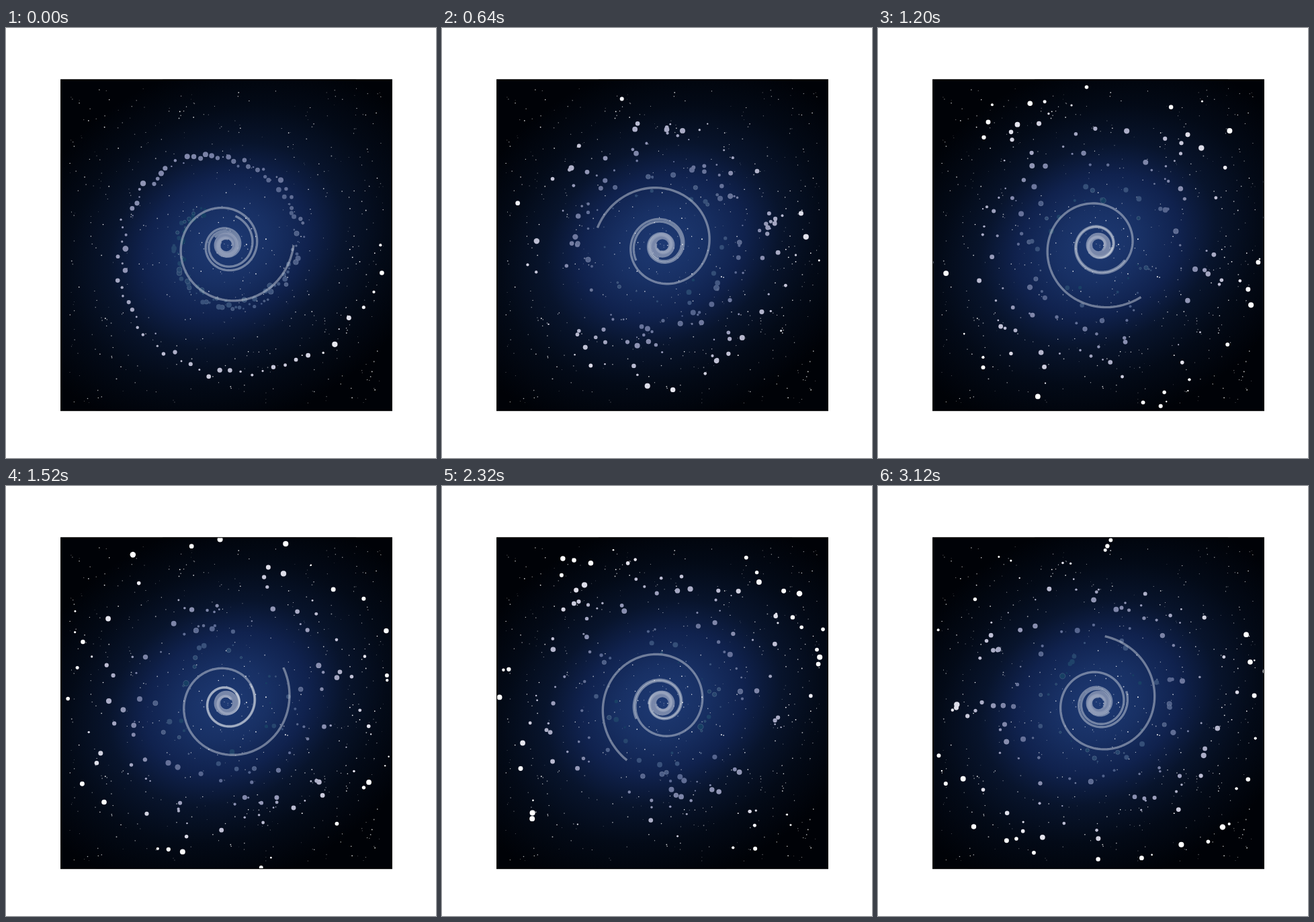
These frames come from a looping animation (640 by 640 pixels, 3200 ms). An HTML page with a canvas:

```html
<!DOCTYPE html>
<html lang="en">
<head>
<meta charset="utf-8">
<title>Spiral galaxy</title>
<style>
html, body { margin: 0; width: 100%; height: 100%; overflow: hidden; background: #fff; }
canvas { display: block; }
</style>
</head>
<body>
<canvas id="stage" width="640" height="640"></canvas>
<script>
const ctx = document.getElementById('stage').getContext('2d');
const TAU = Math.PI * 2, SIDE = 492.8, HALF = SIDE / 2;
const STEP = 80, STEPS = 40, SPREAD_STEPS = 14;
const DECAY = 0.126, INNER = 9.3;

let seed = 11;
function rand(a = 0, b = 1) {
  seed = (seed * 1664525 + 1013904223) % 4294967296;
  return a + (b - a) * seed / 4294967296;
}

// Stars start along one long spiral and then scatter
const stars = Array.from({ length: 165 }, (_, i) => {
  const angle = 10.5 * (i / 165) ** 0.8;
  return {
    angle,
    start: 234 * Math.exp(-DECAY * angle) + rand(-9, 9),
    goal: rand(65, 265),
    size: rand(1, 4.2),
    speed: rand(0.08, 0.5),
    rim: rand() < 0.4
  };
});

const specks = Array.from({ length: 560 }, () => ({
  x: rand(-233, 234), y: rand(-234, 235), size: rand(0.3, 0.95), alpha: rand(0.35, 1)
}));

function disc(x, y, r, fill) {
  ctx.fillStyle = fill;
  ctx.beginPath();
  ctx.arc(x, y, r, 0, TAU);
  ctx.fill();
}

// Teal near the centre, white at the rim
function tint(dist) {
  const k = Math.min(1, Math.max(0, (dist - 65) / 170));
  return `rgb(${20 + 235 * k}, ${62 + 193 * k ** 1.25}, ${98 + 157 * k})`;
}

function nebula() {
  ctx.fillStyle = '#000207';
  ctx.fillRect(-HALF, -HALF, SIDE, SIDE);
  const g = ctx.createRadialGradient(0, 0, 0, 0, 0, 330);
  g.addColorStop(0, '#1e3a74');
  g.addColorStop(0.2, '#183064');
  g.addColorStop(0.38, '#10224e');
  g.addColorStop(0.55, '#08142c');
  g.addColorStop(0.75, '#030a17');
  g.addColorStop(1, '#000207');
  ctx.save();
  ctx.rotate(-0.45);
  ctx.scale(1, 0.8);
  disc(0, 0, 330, g);
  ctx.restore();
}

function spiral(outer, turn) {
  const sweep = Math.log(outer / INNER) / DECAY;
  ctx.beginPath();
  for (let a = 0; a < sweep; a += 0.05) {
    const r = outer * Math.exp(-DECAY * a);
    ctx.lineTo(r * Math.cos(a - turn), r * Math.sin(a - turn));
  }
  ctx.stroke();
}

function drawStar(s, n) {
  const r = s.start + (s.goal - s.start) * Math.min(1, n / SPREAD_STEPS);
  const a = s.angle - s.speed * n;
  disc(r * Math.cos(a), r * Math.sin(a), s.size, tint(r));
  if (s.rim) {
    ctx.strokeStyle = 'rgba(255,255,255,.2)';
    ctx.lineWidth = 0.7;
    ctx.stroke();
  }
}

function draw(n) {
  ctx.fillStyle = '#fff';
  ctx.fillRect(0, 0, 640, 640);
  ctx.save();
  ctx.translate(328, 323.2);
  ctx.save();
  ctx.beginPath();
  ctx.rect(-HALF, -HALF, SIDE, SIDE);
  ctx.clip();

  nebula();
  for (const s of specks) disc(s.x, s.y, s.size, `rgba(255,255,255,${s.alpha})`);
  for (const s of stars) drawStar(s, n);

  // Each shorter arm starts one full turn further in and turns more slowly
  ctx.strokeStyle = 'rgba(222,226,232,.45)';
  ctx.lineWidth = 3.4;
  ctx.lineJoin = 'round';
  for (let k = 0; k < 3; k++) {
    spiral(100 * Math.exp(-DECAY * TAU * k), 1.27 * k + (0.36 - 0.06 * k) * n);
  }

  // Bright core
  ctx.strokeStyle = 'rgba(143,156,184,.8)';
  ctx.lineWidth = 9.5;
  ctx.beginPath();
  ctx.arc(0, 0, 13.7, 0, TAU);
  ctx.stroke();
  ctx.restore();

  ctx.strokeStyle = '#000';
  ctx.lineWidth = 1.1;
  ctx.strokeRect(-HALF, -HALF, SIDE, SIDE);
  ctx.restore();
}

function tick() {
  draw(Math.floor(performance.now() / STEP) % STEPS);
  requestAnimationFrame(tick);
}
tick();
</script>
</body>
</html>
```
